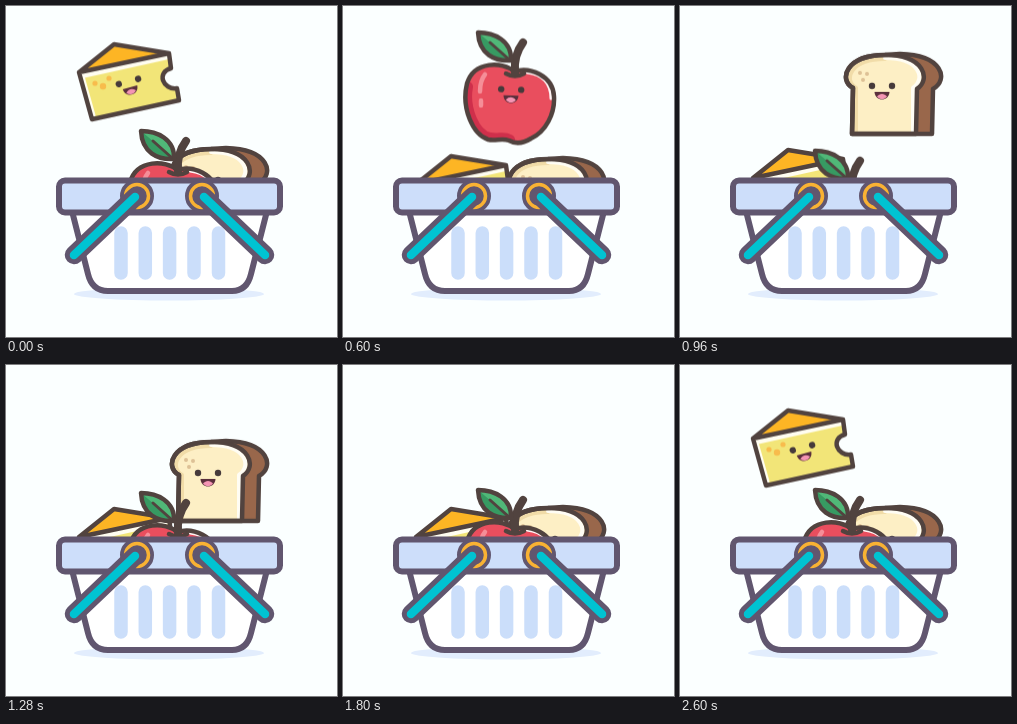
Write an HTML page that moves like this. It is 331 px wide and 331 px high and loops after 2640 ms.

```html
<!DOCTYPE html>
<html lang="en">
<head>
<meta charset="utf-8">
<title>Grocery basket</title>
<style>
html, body { margin: 0; width: 100%; height: 100%; overflow: hidden; background: #fbffff; }
svg { display: block; width: 100vw; height: 100vh; }

.food {
  animation: hop 2640ms infinite;
  stroke-linejoin: round;
  stroke-linecap: round;
}
.cheese { animation-delay: -480ms; }
.apple { animation-delay: -2480ms; }
.bread { animation-name: hover; animation-delay: -2140ms; }

/* dip, rise against gravity, fall, settle */
@keyframes hop {
  0% { transform: translateY(0); animation-timing-function: cubic-bezier(.333, 0, .667, 1); }
  8.33% { transform: translateY(28px); animation-timing-function: cubic-bezier(.333, .667, .667, 1); }
  19.7% { transform: translateY(-108px); animation-timing-function: cubic-bezier(.333, 0, .667, .333); }
  30.68% { transform: translateY(28px); animation-timing-function: cubic-bezier(.333, 0, .667, 1); }
  45.45%, 100% { transform: translateY(0); }
}
@keyframes hover {
  0% { transform: translateY(0); animation-timing-function: cubic-bezier(.333, 0, .667, 1); }
  9.47% { transform: translateY(28px); animation-timing-function: cubic-bezier(.333, .667, .667, 1); }
  21.21% { transform: translateY(-108px); animation-timing-function: linear; }
  23.48% { transform: translateY(-108px); animation-timing-function: cubic-bezier(.333, 0, .667, .333); }
  34.47% { transform: translateY(28px); animation-timing-function: cubic-bezier(.333, 0, .667, 1); }
  49.24%, 100% { transform: translateY(0); }
}
.line { fill: none; stroke: #51433f; stroke-width: 4.5; }
.rim { stroke: #61566f; stroke-width: 6; }
</style>
</head>
<body>
<svg viewBox="0 0 331 331">
  <defs>
    <clipPath id="above"><path d="M0 0H331V182H0Z"/></clipPath>
    <path id="body" d="M171 67C160 57 131 56 124 79C118 104 130 130 145 135C153 137 158 133 166 136C173 140 180 139 188 134C203 127 212 109 211 92C210 71 187 62 171 67Z"/>
    <path id="leaf" d="M135 28C151 28 169 36 168 56C152 57 136 50 135 28Z"/>
    <path id="slice" d="M172 128L173 82C158 74 166 49 205 49C245 49 251 74 237 83L236 128Z"/>
    <clipPath id="skin"><use href="#body"/></clipPath>
    <clipPath id="crumb"><use href="#slice"/></clipPath>
    <g id="face">
      <circle cx="-10" cy="-6" r="3.2" fill="#463a3b"/>
      <circle cx="10" cy="-6" r="3.2" fill="#463a3b"/>
      <path d="M-7.5 0H7.5C7 10-7 10-7.5 0Z" fill="#5a2f3c"/>
      <path d="M-5 4.5C-2 1 2 1 5 4.5C2 8-2 8-5 4.5Z" fill="#f595b4"/>
    </g>
    <g id="handle">
      <circle cx="131" cy="190" r="14.5" fill="#61566f" stroke="#61566f" stroke-width="5"/>
      <circle cx="131" cy="190" r="11.5" fill="#61566f" stroke="#f9b233" stroke-width="3.5"/>
      <g stroke-linecap="round">
        <path d="M129 191L68 249" stroke="#61566f" stroke-width="18.5"/>
        <path d="M129 191L68 249" stroke="#00c3d2" stroke-width="8.5"/>
      </g>
    </g>
  </defs>

  <rect width="331" height="331" fill="#fbffff"/>
  <ellipse cx="163" cy="288" rx="95" ry="6.5" fill="#e2edfd"/>

  <g clip-path="url(#above)">
    <g class="food cheese"><g transform="translate(0 106)">
      <path d="M73 67L86 113L173 94L171 82C157 84 150 66 165 62L163 47Z" fill="#f2e578"/>
      <path d="M76 69L162 50" fill="none" stroke="#fffdf0" stroke-width="6"/>
      <path d="M77 70L88 109" fill="none" stroke="#fffdf0" stroke-width="3"/>
      <path d="M73 66L108 38L163 47Z" fill="#fdb524"/>
      <g fill="#f8bc4c">
        <circle cx="89" cy="77" r="2.6"/><circle cx="97" cy="80" r="3.2"/><circle cx="103" cy="72" r="2.6"/>
      </g>
      <path class="line" d="M163 47L108 38L73 66L86 113L173 94L171 82C157 84 150 66 165 62L163 47L73 66"/>
      <use href="#face" transform="translate(124 81) rotate(-15)"/>
    </g></g>

    <g class="food bread"><g transform="translate(0 94)">
      <path id="loaf" d="M172 128L173 82C158 74 166 49 205 49L220 48C263 49 269 74 253 83L252 128Z" fill="#99674b"/>
      <use href="#slice" fill="#fdefc5"/>
      <g clip-path="url(#crumb)" fill="none">
        <path d="M176 128V82C163 74 170 53 205 53" stroke="#f1dca8" stroke-width="4"/>
        <path d="M205 52C240 52 246 73 233 82V128" stroke="#fffdf4" stroke-width="4"/>
      </g>
      <g fill="#ddc196">
        <circle cx="180" cy="67" r="2"/><circle cx="187" cy="68" r="2"/><circle cx="183" cy="74" r="2"/>
      </g>
      <use href="#slice" class="line"/>
      <path class="line" d="M172 128L173 82C158 74 166 49 205 49L220 48C263 49 269 74 253 83L252 128Z"/>
      <use href="#face" transform="translate(202 86)"/>
    </g></g>

    <g class="food apple"><g transform="translate(0 97)">
      <use href="#body" fill="#e94e5e"/>
      <g clip-path="url(#skin)" fill="none">
        <path d="M125 82C121 104 132 130 147 133C156 135 160 131 167 135" stroke="#cf2f4b" stroke-width="10"/>
        <path d="M184 68C200 70 208 78 208 94" stroke="#fff4f4" stroke-width="3"/>
      </g>
      <path d="M142 70Q137 76 137 87M138 96V101" fill="none" stroke="#f58e98" stroke-width="4.5"/>
      <use href="#body" class="line"/>
      <path class="line" d="M163 69Q172 74 181 69"/>
      <path class="line" d="M172 68C171 56 174 46 180 38" style="stroke-width:8"/>
      <use href="#leaf" fill="#50b878"/>
      <path d="M135 28C136 50 152 57 168 56Z" fill="#379a62"/>
      <use href="#leaf" class="line"/>
      <path class="line" d="M147 38L165 54" style="stroke-width:3"/>
      <use href="#face" transform="translate(168 91) rotate(2)"/>
    </g></g>
  </g>

  <path class="rim" d="M66 205L82 268Q86 285 102 285H226Q241 285 245 268L261 205Z" fill="#fff"/>
  <path d="M115 227V267M139.3 227V267M163.6 227V267M188 227V267M212.5 227V267" stroke="#cbdefa" stroke-width="13.5" stroke-linecap="round"/>
  <rect class="rim" x="53" y="174.5" width="221" height="32" rx="6" fill="#cddefa"/>
  <use href="#handle"/>
  <use href="#handle" transform="translate(327 0) scale(-1 1)"/>
</svg>
</body>
</html>
```
